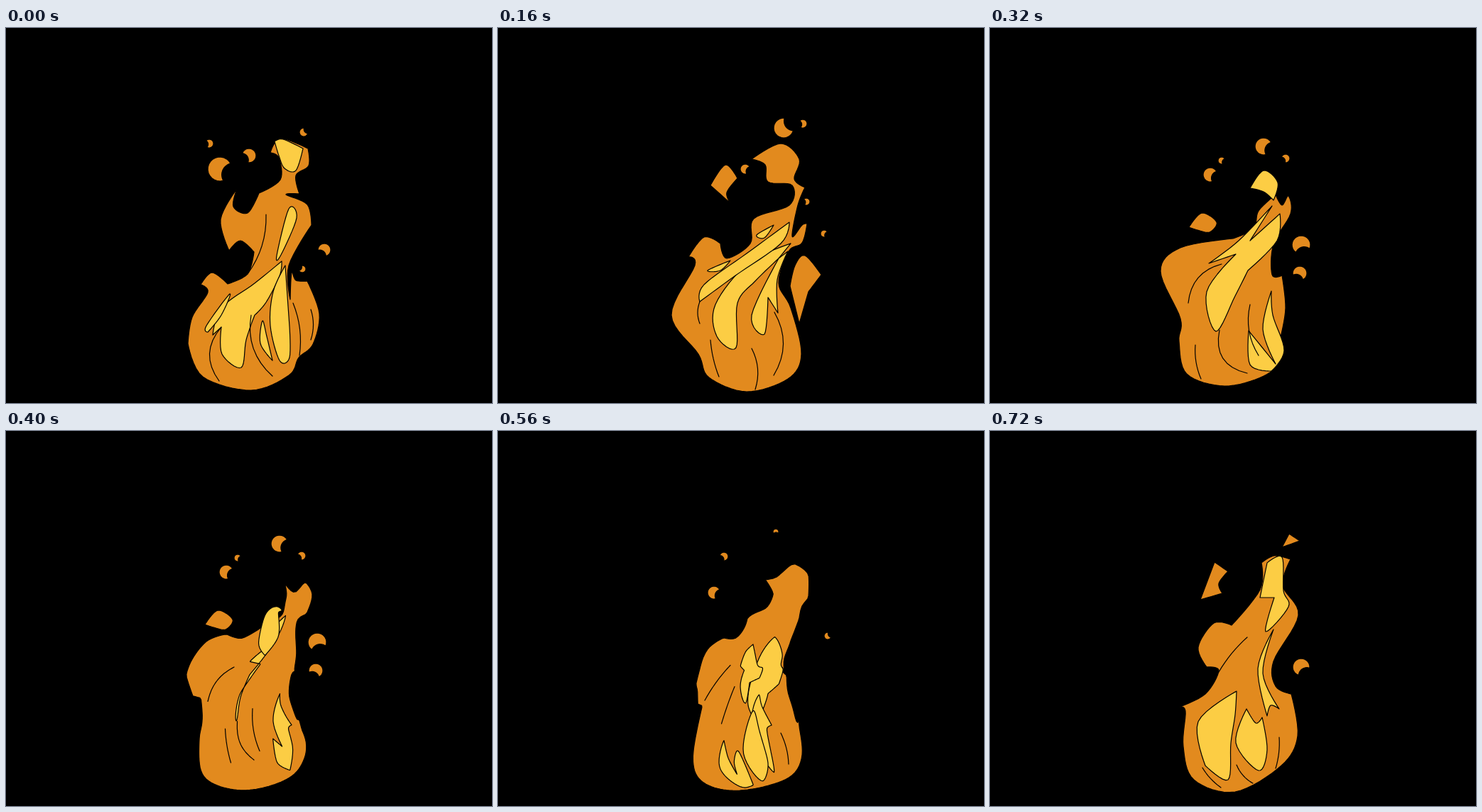
These frames come from a looping animation (684x529 px, 0.8 s). An HTML page with a canvas:

```html
<!DOCTYPE html>
<html>
<head>
<meta charset="utf-8">
<title>Flame</title>
<style>
html, body { margin: 0; width: 100%; height: 100%; overflow: hidden; background: #000; }
canvas { display: block; }
</style>
</head>
<body>
<canvas id="stage" width="684" height="529"></canvas>
<script>
const FRAME_MS = 80, ORANGE = '#e28a1e', YELLOW = '#fccd44';
const ctx = document.getElementById('stage').getContext('2d');
const poses = [];
let pose;

// Smooth closed outline; "!" marks a sharp corner.
function outline(text) {
  const knots = text.split(' ').map(item => {
    const [x, y] = item.split(',').map(parseFloat);
    return { x, y, sharp: item.endsWith('!') };
  });
  const n = knots.length, at = i => knots[(i + n) % n], points = [];
  const slope = (i, axis) => at(i).sharp ? 0 : (at(i + 1)[axis] - at(i - 1)[axis]) / 6;
  for (let i = 0; i < n; i++) {
    for (let t = 0; t < 1; t += 0.125) {
      const u = 1 - t;
      points.push(['x', 'y'].map(axis => {
        const p = at(i)[axis], q = at(i + 1)[axis];
        return u ** 3 * p + 3 * u * u * t * (p + slope(i, axis)) +
          3 * u * t * t * (q - slope(i + 1, axis)) + t ** 3 * q;
      }));
    }
  }
  return points;
}

function scene() { poses.push(pose = { body: [], bits: [], glows: [], lines: [] }); }
const body = text => pose.body.push(outline(text));
const bit = text => pose.bits.push(outline(text));
const glow = text => pose.glows.push(outline(text));

// Crescent whose bite faces the given angle.
function spark(x, y, r, angle = 0.4) {
  const points = [];
  for (let a = 0.9; a <= 5.4; a += 0.25) {
    points.push([x + r * Math.cos(angle + a), y + r * Math.sin(angle + a)]);
  }
  for (let a = -0.8; a <= 0.8; a += 0.2) {
    const c = r * (1.25 - Math.cos(a)), s = r * 0.98 * Math.sin(a);
    points.push([x + c * Math.cos(angle) - s * Math.sin(angle), y + c * Math.sin(angle) + s * Math.cos(angle)]);
  }
  pose.bits.push(points);
}

function line(x1, y1, x2, y2, bend = 0) {
  const dx = x2 - x1, dy = y2 - y1, len = Math.hypot(dx, dy), points = [];
  for (let t = 0; t <= 1; t += 0.125) {
    const k = 2 * t * (1 - t) * bend / len;
    points.push([x1 + dx * t - dy * k, y1 + dy * t + dx * k]);
  }
  pose.lines.push(points);
}

// Evenly spaced points along a polyline.
function resample(points, count) {
  const dist = [0];
  for (let i = 1; i < points.length; i++) {
    dist.push(dist[i - 1] + Math.hypot(points[i][0] - points[i - 1][0], points[i][1] - points[i - 1][1]));
  }
  const result = [];
  for (let k = 0, i = 1; k < count; k++) {
    const d = dist[dist.length - 1] * k / (count - 1);
    while (i < points.length - 1 && dist[i] < d) i++;
    const t = (d - dist[i - 1]) / (dist[i] - dist[i - 1] || 1);
    result.push(points[i].map((v, axis) => points[i - 1][axis] + (v - points[i - 1][axis]) * t));
  }
  return result;
}

// Splitting at the lowest point keeps tip and base aligned in a blend.
function normalise(points, closed) {
  if (!closed) return resample(points, 20);
  const low = points.reduce((best, p, i) => p[1] > points[best][1] ? i : best, 0);
  return [...resample(points.slice(0, low + 1), 100),
          ...resample([...points.slice(low), points[0]], 100)];
}

const gap = (a, b) => Math.hypot(a[0][0] - b[0][0], a[0][1] - b[0][1]);

function blend(from, to, closed) {
  return from.flatMap(shape => {
    const mate = to.reduce((best, s) => gap(shape, s) < gap(shape, best) ? s : best);
    if (gap(shape, mate) > 80) return [];
    const end = normalise(mate, closed);
    return [normalise(shape, closed).map((p, i) => [(p[0] + end[i][0]) / 2, (p[1] + end[i][1]) / 2])];
  });
}

const between = (a, b) => ({
  body: blend(a.body, b.body, true),
  bits: a.bits.map(shape => shape.map(([x, y]) => [x, y - 8])),
  glows: blend(a.glows, b.glows, true),
  lines: blend(a.lines, b.lines, false)
});

scene();
body('372,176! 386,156 425,170! 426,194 408,208 413,234! 394,235 424,249 430,278! 398,335 400,383! 402,345 408,356 424,357! 441,403 432,446 412,465 398,490 345,511 277,492 256,445! 262,408 284,373 274,362! 290,345 312,361! 340,347 349,316! 330,300 314,314! 302,270 325,227! 320,252 340,261 356,233! 386,214 384,183');
glow('388,329! 385,350 366,387 350,405! 338,440 331,479 304,460 303,422! 291,433! 303,395 350,360');
glow('393,335! 399,421! 399,465 385,469 372,420 376,372');
glow('378,160! 390,157 418,170! 408,201 392,198 384,180');
glow('398,255 409,268 387,320 381,321');
glow('315,375 282,420 284,429! 303,405');
glow('361,413 358,445 375,469! 367,435');
spark(286, 163, 6, 3);
spark(301, 199, 17);
spark(342, 180, 10, 2.6);
spark(448, 313, 9, 2.2);
spark(419, 147, 6, -0.6);
spark(417, 340, 5, 3.6);
line(366, 263, 340, 347, -15);
line(303, 422, 300, 498, 30);
line(345, 405, 375, 491, 25);
line(404, 388, 413, 462, -10);
line(429, 397, 429, 440, -7);

scene();
body('377,190! 400,176! 421,198! 410,222 430,257! 420,278 429,277! 424,300 402,332 397,370 409,412 420,450 405,486 345,513 289,490 273,452 247,410 271,350 287,334! 272,331! 290,305 310,319 336,306 336,284! 360,266 395,245 386,207');
bit('326,208! 344,245! 339,272! 321,278 321,291! 300,265 306,231!');
bit('382,170 392,150! 411,154! 399,172! 384,175!');
bit('418,331! 434,328! 446,346! 444,378! 438,401! 417,416! 409,360');
glow('404,317! 378,340 346,388 336,425 330,466! 308,455 311,398 357,338');
glow('391,297! 341,341 295,398 278,399 297,345 350,324');
glow('402,322! 392,378 397,448 376,457! 359,401 374,434! 374,365');
glow('403,235! 418,240! 410,274!');
spark(424, 142, 5);
spark(425, 223, 6);
spark(451, 298, 6);
line(302, 467, 315, 500, 4);
line(367, 483, 364, 508, -4);

scene();
body('357,185! 398,163 424,185 417,213 432,225! 422,250 414,294 428,278 435,276! 428,303 409,315 395,360 412,395 427,460 408,495 350,513 297,493 282,460 244,405 277,335 268,323! 290,295 313,304! 322,325 355,304 360,269 410,250 414,222 380,217 376,193');
bit('432,321 455,348! 437,372! 424,417! 411,364! 418,335');
bit('299,222! 320,193 337,212! 322,232 327,247!');
glow('412,304! 352,332 306,390 308,435 335,451 337,388 362,357 395,325!');
glow('395,325! 357,405 375,432 380,380! 394,402! 393,355 408,315!');
glow('410,274! 350,318 290,362 284,386! 333,350 398,304');
glow('388,278! 364,292 375,296');
glow('327,328! 295,342 313,342');
spark(402, 141, 14, -0.6);
spark(429, 135, 6, 3);
spark(348, 199, 7);
spark(434, 245, 5, 3);
spark(459, 290, 5);
line(299, 440, 311, 492, 4);
line(357, 452, 362, 510, -12);
line(389, 401, 388, 490, -26);
line(284, 386, 284, 417, 6);

scene();
body('402,235! 411,250 420,237 423,262 399,305 397,348 411,349! 416,395 409,436! 411,466 385,491 330,505 277,488 266,442 268,410 240,343 268,310 342,297! 371,283 378,258');
bit('280,281! 298,261 319,274 309,288 292,285');
glow('397,251! 350,300 308,332! 346,319! 305,372 318,428 345,378 363,342! 404,300 408,262! 366,300!');
glow('396,371! 384,425 402,474! 364,427! 366,475 396,484! 414,455 398,405');
glow('366,226! 385,201 405,218 399,243! 385,231');
spark(385, 167, 12);
spark(416, 184, 6, 2.6);
spark(310, 207, 10);
spark(326, 187, 5);
spark(438, 306, 13, 1.3);
spark(436, 346, 10, 2);
line(326, 333, 279, 388, 25);
line(289, 447, 297, 495, 6);
line(323, 426, 362, 487, 35);
line(366, 390, 378, 462, 15);

scene();
body('383,195! 400,206 423,188! 438,205 432,238! 414,245 422,298 410,332! 392,330 382,365 404,398 413,391! 433,428 422,478 380,502 325,508 282,490 276,445 290,365! 274,372! 266,340! 279,318 297,282 324,270! 345,285 378,251 405,240 406,212');
glow('390,270 402,293 380,315 360,362 330,390! 318,360 352,292');
glow('375,370! 369,400 404,473! 387,410 402,412! 378,388');
glow('358,415 350,460 370,497 387,478 368,438');
glow('327,465 325,490 361,502! 345,476');
glow('329,291! 324,310 297,340 298,318 312,300! 300,305 312,289');
spark(391, 150, 4, 1.5);
spark(318, 185, 6, 2.5);
spark(304, 236, 9);
spark(464, 297, 5, -0.5);
spark(397, 344, 4, 3);
line(316, 333, 289, 375, 5);
line(328, 393, 336, 441);
line(405, 416, 430, 450);

scene();
body('370,225! 404,187 436,198! 442,243 432,272! 404,296! 389,325 405,351 427,347! 438,392 431,431! 421,400 416,412 427,455 410,488 345,505 297,500 273,470 293,382! 290,340 330,292 329,272! 368,247!');
bit('285,225! 305,196 342,188 360,210 352,221! 328,218 305,257!');
bit('285,280 290,270! 305,272! 298,304!');
glow('402,193! 428,215 420,262! 386,298 352,310! 376,262! 408,225 367,256! 400,215');
glow('389,311! 405,352 424,355 420,376! 398,382! 400,428 381,390');
glow('360,374 340,445 373,490 370,435');
glow('309,408! 298,465 325,502 360,501! 326,419 318,455 332,497! 313,455');
glow('292,211! 331,191! 325,209 304,221');
glow('380,208! 397,197 392,218!');
spark(420, 166, 13, 1.3);
spark(389, 167, 4);
line(405, 240, 320, 300, -8);
line(352, 310, 338, 430);
line(338, 328, 293, 385, 3);
line(391, 436, 388, 490, -10);

scene();
body('382,186! 400,176 423,181! 412,218 434,260 399,325 402,360 424,371! 433,430 410,472 345,509 287,492 272,445 275,395 265,390! 303,371 322,338 305,333! 293,305 315,271 340,274! 380,224');
bit('296,238! 316,185! 335,198! 322,215 327,229!');
bit('411,164! 421,145! 436,155!');
glow('390,186! 411,178 413,225 420,248 388,283 400,235! 380,235!');
glow('399,280! 377,335 390,402! 395,387 407,392! 384,342');
glow('347,367! 293,410 303,472! 335,492 339,440 345,400');
glow('361,392! 346,440 378,479 390,450 383,404! 374,412');
spark(438, 333, 12, 1);
line(362, 291, 322, 340, 5);
line(299, 475, 325, 503, 4);
line(347, 471, 370, 497, 6);
line(407, 432, 402, 476, -4);

// The last poses before the loop's end follow directly; three others get an in-between.
const frames = poses.flatMap((p, i) => i >= 2 && i <= 4 ? [p, between(p, poses[i + 1])] : [p]);

function paint(shapes, fill) {
  for (const points of shapes) {
    ctx.beginPath();
    points.forEach(([x, y]) => ctx.lineTo(x, y));
    if (fill) {
      ctx.closePath();
      ctx.fillStyle = fill;
      ctx.fill();
    }
    ctx.stroke();
  }
}

function draw() {
  const frame = frames[Math.floor(performance.now() / FRAME_MS) % frames.length];
  ctx.fillStyle = '#000';
  ctx.fillRect(0, 0, 684, 529);
  ctx.lineWidth = 1.2;
  ctx.lineJoin = ctx.lineCap = 'round';
  paint(frame.body, ORANGE);
  paint(frame.bits, ORANGE);
  paint(frame.glows, YELLOW);
  paint(frame.lines);
  requestAnimationFrame(draw);
}
draw();
</script>
</body>
</html>
```
